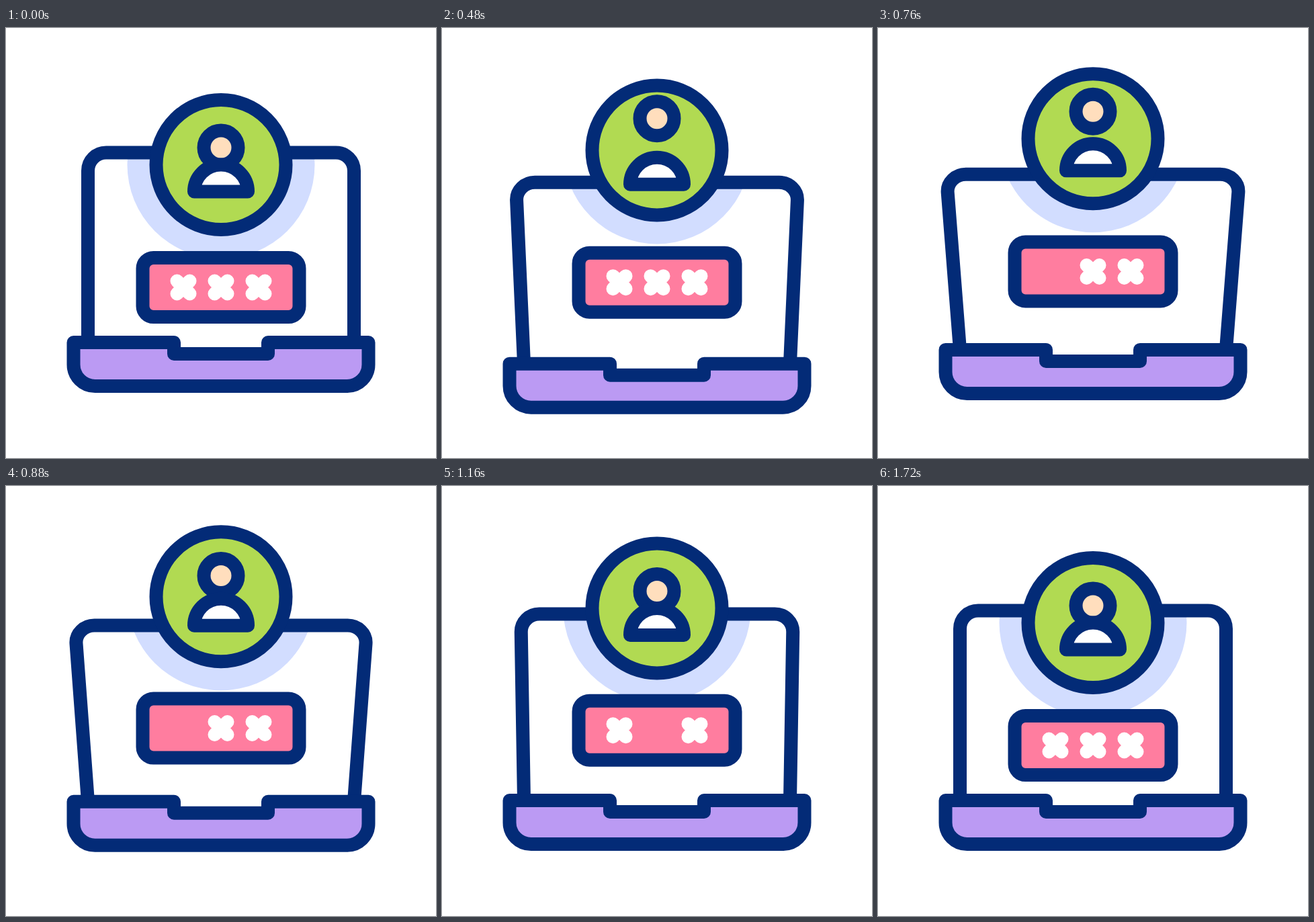
An HTML page for the animation above (2080 ms loop, 640 by 640 pixels).

```html
<!DOCTYPE html>
<html lang="en">
<head>
<meta charset="utf-8">
<title>Laptop login</title>
<style>
  html, body { margin: 0; width: 100%; height: 100%; overflow: hidden; background: #fff; }
  svg { display: block; width: 100%; height: 100%; }
  .line { stroke: #032b77; stroke-width: 20; stroke-linejoin: round; stroke-linecap: round; }
  .star { stroke: #fff; stroke-width: 20; stroke-linecap: round; }
</style>
</head>
<body>
<svg viewBox="0 0 640 640">
  <clipPath id="screen"><path id="screenShape"/></clipPath>
  <g clip-path="url(#screen)"><circle id="halo" cx="320" cy="203.5" r="139.5" fill="#d2ddff"/></g>
  <path id="lid" class="line" fill="none"/>
  <path id="base" class="line" fill="#bb9af3"
    d="M250 468H100.5V501a32 32 0 0 0 32 32H507.5a32 32 0 0 0 32-32V468H390V485H250Z"/>
  <g id="panel">
    <rect class="line" x="203.5" y="342" width="233" height="88" rx="16" fill="#ff7d9f"/>
    <path class="star" d="M254.5 376.5l19 19m0-19l-19 19"/>
    <path class="star" d="M310.5 376.5l19 19m0-19l-19 19"/>
    <path class="star" d="M366.5 376.5l19 19m0-19l-19 19"/>
  </g>
  <g id="badge">
    <circle class="line" cx="320" cy="203.5" r="96.5" fill="#b1da52"/>
    <circle id="head" class="line" cx="320" cy="178" r="25.5" fill="#ffdebd"/>
    <path id="body" class="line" fill="#fff" d="M280 243.5a40 40 0 0 1 80 0Z"/>
  </g>
</svg>
<script>
const LOOP = 2080, STEP = 40;
const STAR_START = 580, STAR_GAP = 380;
const part = id => document.getElementById(id);
const [screenShape, halo, lid, base, panel, badge, head, body] =
  ['screenShape', 'halo', 'lid', 'base', 'panel', 'badge', 'head', 'body'].map(part);
const stars = document.querySelectorAll('.star');

// Cubic ease-in-out with control points (0.42, 0) and (0.58, 1).
function ease(x) {
  if (x <= 0) return 0;
  if (x >= 1) return 1;
  let low = 0, high = 1, s;
  for (let i = 0; i < 24; i++) {
    s = (low + high) / 2;
    const at = 1.26 * (1 - s) ** 2 * s + 1.74 * (1 - s) * s * s + s ** 3;
    if (at < x) low = s; else high = s;
  }
  return s * s * (3 - 2 * s);
}

// Rises from 0 to 1 between a and b, returns to 0 between c and d.
const swing = (t, a, b, c, d) => ease((t - a) / (b - a)) - ease((t - c) / (d - c));

const shift = (element, y) => element.setAttribute('transform', `translate(0 ${y})`);

function lidPath(drop, lean) {
  const side = 0.86 * lean, left = 122 - side, right = 518 + side;
  const top = 185.5 + drop + lean, bottom = 468 + drop;
  const tilt = side * 0.06;
  return `M122 ${bottom}L${left} ${top + 27}` +
    `C${left - tilt} ${top + 12} ${left + 12} ${top} ${left + 27} ${top}H${right - 27}` +
    `C${right - 12} ${top} ${right + tilt} ${top + 12} ${right} ${top + 27}L518 ${bottom}`;
}

function draw(t) {
  const drop = 31.7 * swing(t, 0, 470, 470, 960);
  const lean = 21.3 * swing(t, 180, 720, 800, 1340);
  const rise = -38.7 * swing(t, 160, 760, 880, 1480);
  const spread = swing(t, 80, 560, 560, 1050);
  const shape = lidPath(drop, lean);

  lid.setAttribute('d', shape);
  screenShape.setAttribute('d', shape);
  shift(base, drop);
  shift(halo, rise);
  shift(badge, rise);
  shift(head, -23 * spread);
  shift(body, 11.5 * spread);
  shift(panel, -25.5 * swing(t, 240, 885, 1020, 1590));

  stars.forEach((star, i) => {
    const start = STAR_START + i * STAR_GAP;
    star.style.display = t >= start && t < start + STAR_GAP ? 'none' : '';
  });
}

function tick() {
  const t = performance.now() % LOOP;
  draw(Math.floor(t / STEP) * STEP);
  requestAnimationFrame(tick);
}
tick();
</script>
</body>
</html>
```
